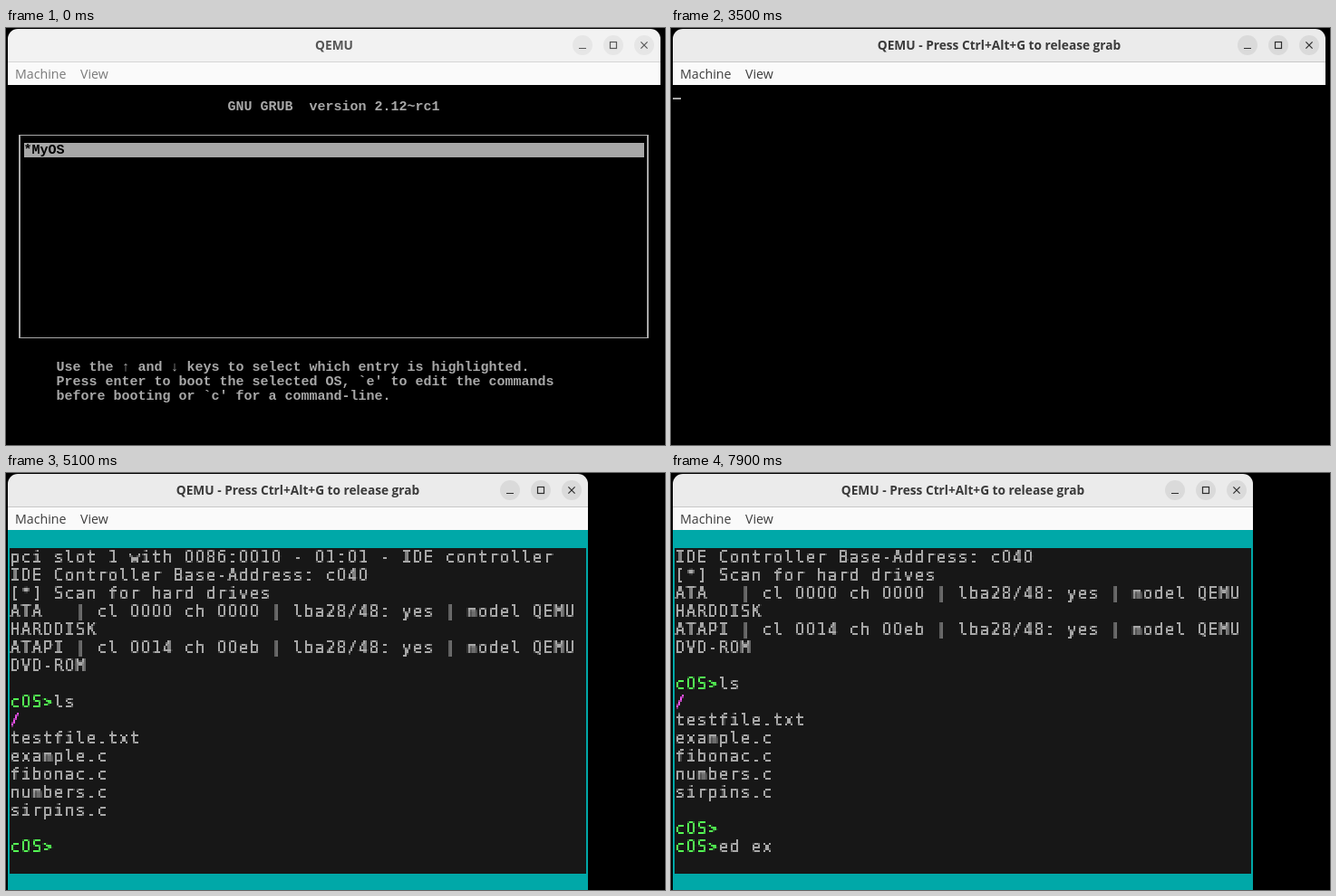
Recreate the animation shown at these times as an HTML page with a canvas. Size 727x461 px, loop 8 s.

```html
<!DOCTYPE html>
<html lang="en">
<head>
<meta charset="utf-8">
<title>QEMU</title>
<style>
html, body { margin: 0; width: 100%; height: 100%; overflow: hidden; background: #000; }
canvas { display: block; width: 727px; height: 461px; }
</style>
</head>
<body>
<canvas id="stage" width="727" height="461"></canvas>
<script>
const LOOP = 8000;
const GRAY = '#a8a8a8', GREEN = '#54fc54', PINK = '#fc54fc', CYAN = '#00a8a8', DARK = '#171717';
const LEFT = 2, SCREEN_TOP = 63;
const ctx = document.getElementById('stage').getContext('2d');

const bootLog = [
  'Type help for a list of commands',
  '',
  'Booting...',
  '[*] Scan for PCI IDE controllers',
  'pci slot 0 with 0086:0037 - 00:00',
  'pci slot 1 with 0086:0010 - 01:01 - IDE controller',
  'IDE Controller Base-Address: c040',
  '[*] Scan for hard drives',
  'ATA   | cl 0000 ch 0000 | lba28/48: yes | model QEMU',
  'HARDDISK',
  'ATAPI | cl 0014 ch 00eb | lba28/48: yes | model QEMU',
  'DVD-ROM',
  ''
];
const listing = ['/', 'testfile.txt', 'example.c', 'fibonac.c', 'numbers.c', 'sirpins.c', ''];

// What stands on the prompt from each moment on
const typing = [
  [0, ''], [4700, 'l'], [4800, 'ls'], [5100, ''], [6300, 'r'], [7100, ''],
  [7300, 'e'], [7400, 'ed'], [7500, 'ed '], [7700, 'ed e'], [7900, 'ed ex']
];

function rect(color, x, y, w, h) {
  ctx.fillStyle = color;
  ctx.fillRect(x, y, w, h);
}

function text(str, x, y, color, font, align = 'left') {
  ctx.font = font;
  ctx.fillStyle = color;
  ctx.textAlign = align;
  ctx.fillText(str, x, y);
}

function mixGray(a, b, p) {
  const v = Math.round(a + (b - a) * p);
  return `rgb(${v},${v},${v})`;
}

function drawButtons(right, face, ink) {
  const y = 19;
  for (const offset of [86, 52, 18]) {
    ctx.fillStyle = face;
    ctx.beginPath();
    ctx.arc(right - offset, y, 11, 0, Math.PI * 2);
    ctx.fill();
  }
  rect(ink, right - 90, y + 3, 8, 1);
  ctx.strokeStyle = ink;
  ctx.lineWidth = 1.2;
  ctx.strokeRect(right - 55.5, y - 3.5, 7, 7);
  const x = right - 18, r = 3.6;
  ctx.beginPath();
  ctx.moveTo(x - r, y - r);
  ctx.lineTo(x + r, y + r);
  ctx.moveTo(x + r, y - r);
  ctx.lineTo(x - r, y + r);
  ctx.stroke();
}

function drawWindow(width, focus) {
  const right = LEFT + width;
  const title = focus ? 'QEMU - Press Ctrl+Alt+G to release grab' : 'QEMU';
  ctx.fillStyle = mixGray(242, 235, focus);
  ctx.beginPath();
  ctx.roundRect(LEFT, 1, width, 50, [11, 11, 0, 0]);
  ctx.fill();
  rect(mixGray(214, 200, focus), LEFT, 37, width, 1);
  rect('#fafafa', LEFT, 38, width, 25);
  text(title, LEFT + width / 2, 24, mixGray(86, 58, focus), '700 13.7px "Open Sans", sans-serif', 'center');
  const menuInk = mixGray(122, 61, focus), menuFont = '14.2px "Open Sans", sans-serif';
  text('Machine', 10, 56, menuInk, menuFont);
  text('View', 82, 56, menuInk, menuFont);
  drawButtons(right, mixGray(230, 218, focus), mixGray(88, 45, focus));
  rect('#000', LEFT, SCREEN_TOP, width, 400);
}

function vgaText(str, col, row, color = GRAY) {
  text(str, LEFT + col * 9 - 0.5, SCREEN_TOP + row * 16 + 12, color, '700 15px "Liberation Mono", monospace');
}

function drawBootMenu() {
  vgaText('GNU GRUB  version 2.12~rc1', 27, 1);
  rect(GRAY, 14, 118, 695, 1);
  rect(GRAY, 14, 342, 695, 1);
  rect(GRAY, 14, 118, 2, 225);
  rect(GRAY, 707, 118, 2, 225);
  rect(GRAY, 20, 127, 684, 16);
  vgaText('*MyOS', 2, 4, '#000');
  vgaText('Use the ↑ and ↓ keys to select which entry is highlighted.', 6, 19);
  vgaText("Press enter to boot the selected OS, `e' to edit the commands", 6, 20);
  vgaText("before booting or `c' for a command-line.", 6, 21);
}

// Terminal text is set at half size, sharpened, then doubled into blocky pixels
const COLS_W = 320, ROWS_H = 200;
const sheet = document.createElement('canvas');
sheet.width = COLS_W;
sheet.height = ROWS_H;
const pen = sheet.getContext('2d', { willReadFrequently: true });
let shown = null;

function colorAt(line, i) {
  if (line.startsWith('cOS>') && i < 4) return GREEN;
  if (line === '/') return PINK;
  const help = line.indexOf('help');
  return help >= 0 && i >= help && i < help + 4 ? PINK : GRAY;
}

function setTerminalText(lines) {
  const key = lines.join('\n');
  if (key === shown) return;
  shown = key;
  pen.clearRect(0, 0, COLS_W, ROWS_H);
  pen.font = '9.2px "DejaVu Sans Mono", monospace';
  pen.textAlign = 'center';
  lines.forEach((line, row) => {
    [...line].forEach((char, i) => {
      pen.fillStyle = colorAt(line, i);
      // this typeface has an empty zero
      pen.fillText(char === '0' ? 'O' : char, 4 + i * 6, 18 + row * 10);
    });
  });
  const image = pen.getImageData(0, 0, COLS_W, ROWS_H);
  for (let i = 3; i < image.data.length; i += 4) {
    image.data[i] = 255 * Math.min(1, Math.max(0, (image.data[i] / 255 - 0.2) / 0.35));
  }
  pen.putImageData(image, 0, 0);
}

function terminalLines(t) {
  const typed = typing.filter(([from]) => t >= from).pop()[1];
  const lines = [...bootLog];
  if (t >= 5100) lines.push('cOS>ls', ...listing);
  if (t >= 5400) lines.push('cOS>');
  lines.push('cOS>' + typed);
  return lines.slice(-17);
}

function drawTerminal(t) {
  rect(CYAN, LEFT, SCREEN_TOP, 640, 400);
  rect(DARK, LEFT + 2, SCREEN_TOP + 20, 636, 360);
  setTerminalText(terminalLines(t));
  ctx.imageSmoothingEnabled = false;
  ctx.drawImage(sheet, LEFT, SCREEN_TOP, 640, 400);
}

function draw(t) {
  ctx.setTransform(1, 0, 0, 1, 0, 0);
  rect('#000', 0, 0, 727, 461);
  if (t < 3800) {
    drawWindow(720, Math.min(1, Math.floor(t / 100) / 6));
    if (t < 3100) drawBootMenu();
    else if (t < 3300 || t >= 3500) rect(GRAY, LEFT, 77, 9, 2);
    return;
  }
  // the window is still shrinking to its new width
  if (t < 3900) {
    const stretch = 714 / 640;
    ctx.setTransform(stretch, 0, 0, 1, 5 - LEFT * stretch, 0);
  }
  drawWindow(640, 1);
  drawTerminal(t);
}

const start = performance.now();
function tick() {
  draw((performance.now() - start) % LOOP);
  requestAnimationFrame(tick);
}
tick();
</script>
</body>
</html>
```
